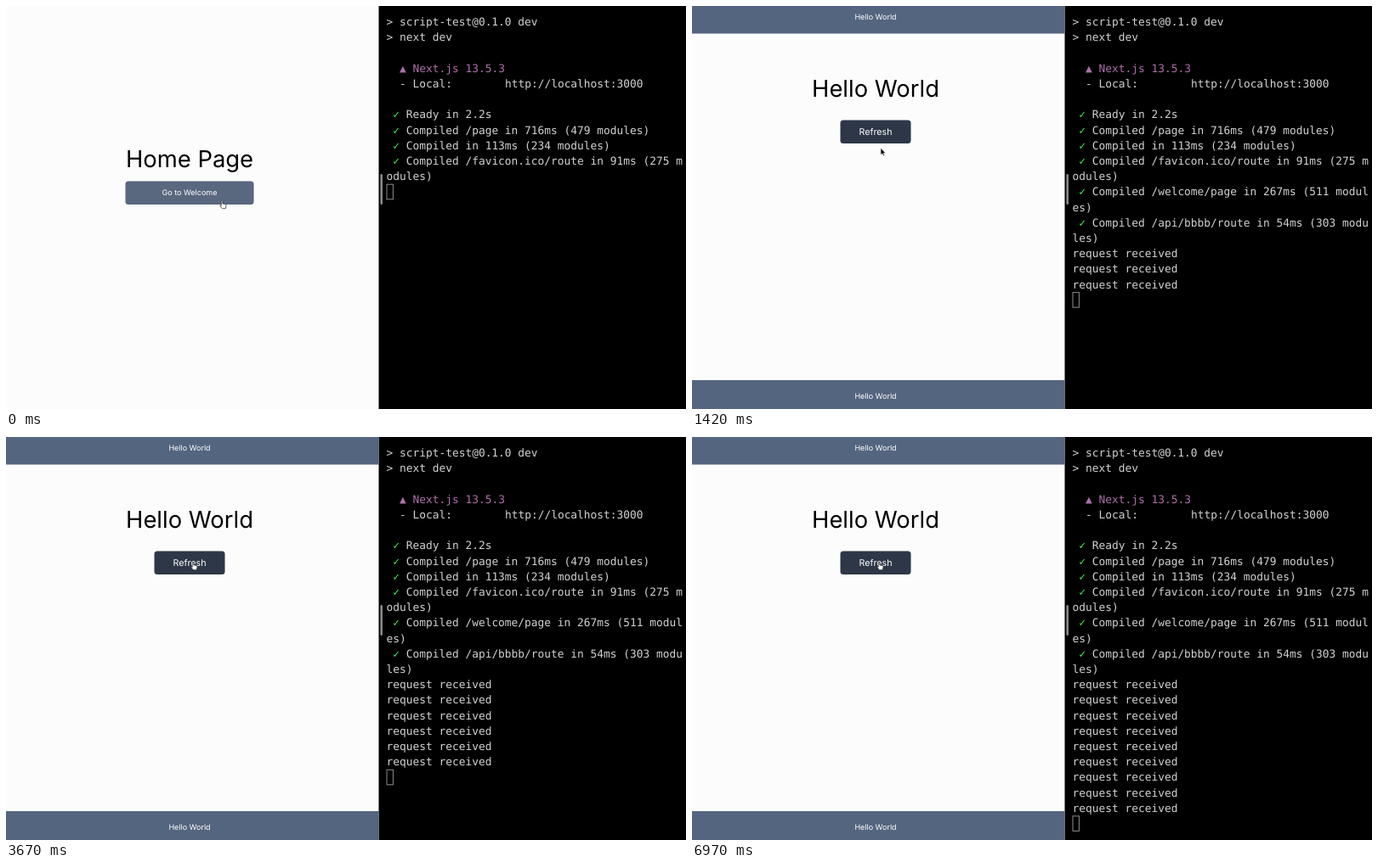
Recreate the animation shown at these times as an HTML page. Size 800 by 475 pixels, loop 7 s.

```html
<!DOCTYPE html>
<html lang="en">
<head>
<meta charset="utf-8">
<title>Refresh demo</title>
<style>
html, body { margin: 0; width: 100%; height: 100%; overflow: hidden; background: #000; }
svg { display: block; width: 800px; height: 475px; }
text { text-rendering: geometricPrecision; }
.ui { font-family: Inter, sans-serif; font-optical-sizing: none; text-anchor: middle; fill: #fff; }
.title { font-size: 27.4px; fill: #000; }
.small { font-size: 9px; }
.label { font-size: 10.7px; }
#term { font: 12.87px "DejaVu Sans Mono", monospace; fill: #d2d2d2; }
#term .ok { fill: #4cf05a; }
#term .brand { fill: #ad70aa; }
</style>
</head>
<body>
<svg viewBox="0 0 800 475">
  <rect width="800" height="475" fill="#000"/>
  <rect width="438.5" height="475" fill="#fcfcfc"/>

  <g id="home" class="ui">
    <text class="title" x="216" y="190.2">Home Page</text>
    <rect x="140.5" y="206.5" width="151" height="27.5" rx="3.5" fill="#59677f"/>
    <text class="small" x="216" y="223.2">Go to Welcome</text>
  </g>

  <g id="welcome" class="ui">
    <rect width="438.5" height="32.5" fill="#54657f"/>
    <rect y="441" width="438.5" height="34" fill="#54657f"/>
    <text class="small" x="216" y="16.3">Hello World</text>
    <text class="small" x="216" y="463.3">Hello World</text>
    <text class="title" x="216" y="107.2">Hello World</text>
    <rect x="174.5" y="134.5" width="83" height="27.5" rx="3.5" fill="#2d3748"/>
    <text class="label" x="216" y="152.3">Refresh</text>
  </g>

  <g id="term"></g>
  <rect id="caret" x="448" width="7.4" height="17.6" fill="none" stroke="#8c8c8c"/>
  <rect x="440.4" y="198" width="2.6" height="36" rx="1.3" fill="#8a8a8a"/>

  <path id="arrow" d="M0 0V8.2L1.9 6.5 3.2 9.4 4.5 8.8 3.2 6H5.8Z" fill="#000" stroke="#fff" stroke-width=".6"/>
  <path id="hand" d="M-.8 6V1a.8.8 0 0 1 1.6 0V3.6l1.3.2 1.3.3 1.2.5c.5.3.5.8.4 1.4L4.3 9.3H.3L-2.1 6.2c-.4-.8.5-1.4 1.3-.2Z" fill="#fff" stroke="#222" stroke-width=".7"/>
</svg>
<script>
const LOOP = 7000, PAGE_SWAP = 730;
const LEFT = 447.5, COL = 7.748, ROW = 18.2, BASE = 23.2;
const $ = id => document.getElementById(id);
const rows = [];

// Each part is [column, text, class].
function addRow(time, ...parts) {
  const g = document.createElementNS("http://www.w3.org/2000/svg", "g");
  for (const [col, str, cls] of parts) {
    const t = document.createElementNS("http://www.w3.org/2000/svg", "text");
    t.setAttribute("x", LEFT + col * COL);
    t.setAttribute("y", BASE + rows.length * ROW);
    if (cls) t.setAttribute("class", cls);
    t.textContent = str;
    g.append(t);
  }
  $("term").append(g);
  rows.push({ time, g });
}
const line = (time, str) => addRow(time, [0, str]);
const done = (time, str) => addRow(time, [1, "✓", "ok"], [3, str]);
const requests = time => {
  for (let i = 0; i < 3; i++) line(time + i * 20, "request received");
};

line(0, "> script-test@0.1.0 dev");
line(0, "> next dev");
addRow(0);
addRow(0, [2, "▲", "brand"], [4, "Next.js 13.5.3", "brand"]);
addRow(0, [2, "- Local:"], [18, "http://localhost:3000"]);
addRow(0);
done(0, "Ready in 2.2s");
done(0, "Compiled /page in 716ms (479 modules)");
done(0, "Compiled in 113ms (234 modules)");
done(0, "Compiled /favicon.ico/route in 91ms (275 m");
line(0, "odules)");
done(320, "Compiled /welcome/page in 267ms (511 modul");
line(320, "es)");
done(500, "Compiled /api/bbbb/route in 54ms (303 modu");
line(500, "les)");
requests(580);
requests(3200);
requests(6300);

// Pointer stops: time, x, y
const path = [[850, 254, 229.4], [1420, 222, 167.4], [1720, 220, 147.4]];

function pointerAt(t) {
  let [time, x, y] = path[0];
  for (const [nt, nx, ny] of path.slice(1)) {
    const k = Math.min(1, Math.max(0, (t - time) / (nt - time)));
    const e = k * k * (3 - 2 * k);
    if (k < 1) return [x + (nx - x) * e, y + (ny - y) * e];
    [time, x, y] = [nt, nx, ny];
  }
  return [x, y];
}

const show = (el, on) => el.setAttribute("visibility", on ? "visible" : "hidden");

function draw(t) {
  show($("home"), t < PAGE_SWAP);
  show($("welcome"), t >= PAGE_SWAP);

  let count = 0;
  for (const { time, g } of rows) {
    show(g, t >= time);
    if (t >= time) count++;
  }
  $("caret").setAttribute("y", 10 + count * ROW);

  const [x, y] = pointerAt(t);
  const hover = t <= path[0][0] || y < 162;
  for (const id of ["arrow", "hand"]) {
    $(id).setAttribute("transform", `translate(${x} ${y})`);
    show($(id), (id === "hand") === hover);
  }
}

const start = performance.now();
function tick() {
  draw((performance.now() - start) % LOOP);
  requestAnimationFrame(tick);
}
draw(0);
requestAnimationFrame(tick);
</script>
</body>
</html>
```
